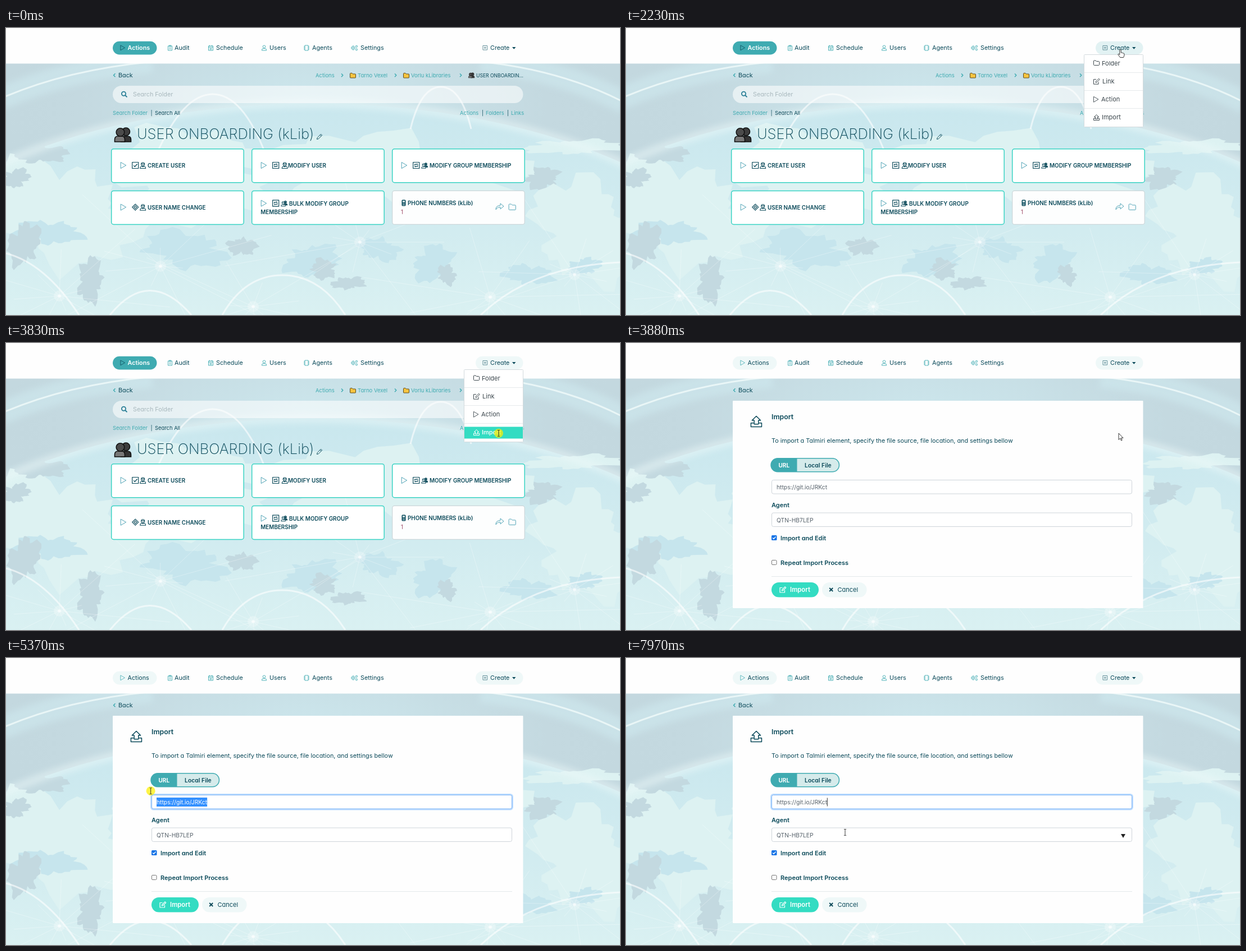
An HTML page that plays this animation: 1093x512 px, repeating every 8 s.

```html
<!DOCTYPE html>
<html lang="en">
<head>
<meta charset="utf-8">
<title>Import an element</title>
<style>
html, body { margin: 0; width: 100%; height: 100%; overflow: hidden; background: #fff; }
svg { display: block; width: 100vw; height: 100vh; }
text { font-family: Inter, "Open Sans", sans-serif; font-feature-settings: "cv11" 1; white-space: pre; }
</style>
</head>
<body>
<svg id="stage" viewBox="0 0 1093 512" xmlns="http://www.w3.org/2000/svg"></svg>
<script>
const INK = '#0b4a5a', TEAL = '#3fabb1', MINT = '#33dcc2', LAND = '#ddf2f2', SLATE = '#c3d9e0', SEA = '#c6e5ed';

const ICONS = {
  play: 'M.5.5L10 6 .5 11.5z',
  clip: 'M.5 1.5h7v8h-7zM2.5.5h3v2h-3zM2.5 5h3M2.5 7.2h3',
  cal: 'M.5 1.5h8v8h-8zM.5 3.8h8M2.5 0v2M6.5 0v2M2.5 6h4M2.5 7.7h4',
  user: 'M4.5.5a2.2 2.2 0 1 1 0 4.6a2.2 2.2 0 1 1 0-4.6zM.5 9.5v-1q0-2.4 2.4-2.4h3.2q2.4 0 2.4 2.4v1z',
  chip: 'M2 .5h6v9H2zM0 2.5h2M0 5h2M0 7.5h2M8 2.5h2M8 5h2M8 7.5h2',
  cogs: 'M4 2a3 3 0 1 1 0 6a3 3 0 1 1 0-6zM4 4a1 1 0 1 1 0 2a1 1 0 1 1 0-2zM4 .8v1.2M4 8v1.2M0 5h1M7 5h1M10 .7a1.6 1.6 0 1 1 0 3.2a1.6 1.6 0 1 1 0-3.2zM10 6.3a1.6 1.6 0 1 1 0 3.2a1.6 1.6 0 1 1 0-3.2z',
  plus: 'M.5.5h8v8h-8zM4.5 2.4v4.2M2.4 4.5h4.2',
  folder: 'M.5 1.5q0-1 1-1H4L5.5 2h4q1 0 1 1v5q0 1-1 1h-8q-1 0-1-1z',
  edit: 'M9 6.5v4H.5V2H5M4 7.5l.5-2 5-5 1.7 1.5-5 5z',
  upload: 'M3 7H.5v3.5h10V7H8M3.5 8V4.5h-2l4-4 4 4h-2V8z',
  check: 'M.5.5h11v11h-11zM3 6l2 2.5 4.5-5',
  loop: 'M.5.5h11v11h-11zM3.5 6.3V4.2h5L7.3 3M8.5 5.7v2.1h-5L4.7 9',
  diamond: 'M6 .5L11.5 6 6 11.5.5 6zM6 3.5L8.5 6 6 8.5 3.5 6z',
  person: 'M5.5 1a2.9 2.9 0 1 1 0 6a2.9 2.9 0 1 1 0-6zM3 2.5q2.5 2.5 5 .5M.6 11.5q0-3.5 3.4-4l1.5 1.2L7 7.5q3.4.5 3.4 4z',
  pencil: 'M.5 10.5l.8-3L8 .8 10.2 3 3.5 9.7zM6.5 2.3l2.2 2.2',
  share: 'M.5 12q-.5-7 8-7.5V1l6 5-6 5V7.6Q3 7.5.5 12z',
  left: 'M3.5.5l-3 3 3 3',
  right: 'M.5.5l3 3-3 3',
  cross: 'M1 1l6 6M7 1L1 7'
};

const icon = (name, x, y, color = TEAL, scale = 1, weight = 1, fill = 'none') =>
  `<path transform="translate(${x} ${y}) scale(${scale})" d="${ICONS[name]}" fill="${fill}" stroke="${color}" stroke-width="${weight}" stroke-linejoin="round"/>`;
const text = (x, y, s, size = 10.8, fill = INK, weight = 400, extra = '') =>
  `<text x="${x}" y="${y}" font-size="${size}" fill="${fill}" font-weight="${weight}" ${extra}>${s}</text>`;
const box = (x, y, w, h, r, fill, extra = '') =>
  `<rect x="${x}" y="${y}" width="${w}" height="${h}" rx="${r}" fill="${fill}" ${extra}/>`;
const line = (d, width = 1, color = '#fff', alpha = 1, extra = '') =>
  `<path d="${d}" fill="none" stroke="${color}" stroke-width="${width}" opacity="${alpha}" ${extra}/>`;
const group = (id, ...parts) => `<g id="${id}">${parts.join('')}</g>`;

// Jagged coastline around an ellipse
function coast(x, y, rx, ry, fill, seed) {
  let d = '';
  for (let i = 0; i < 48; i++) {
    const a = i / 48 * Math.PI * 2;
    const k = .85 + .18 * Math.sin(a * 2 + seed) + .12 * Math.sin(a * 5 + seed * 2.3) + .1 * Math.sin(a * 9 + seed * 5) + .07 * Math.sin(a * 17 + seed);
    d += `${i ? 'L' : 'M'}${(x + rx * k * Math.cos(a)).toFixed(1)} ${(y + ry * k * Math.sin(a)).toFixed(1)}`;
  }
  return `<path d="${d}z" fill="${fill}"/>`;
}

// Rays from a glowing city
function fan(x, y, seed) {
  let d = '';
  for (let i = 0; i < 11; i++) {
    const a = i * .571 + seed, r = 150 + 110 * Math.sin(seed * 9 + i * 4);
    d += `M${x} ${y}l${(r * Math.cos(a)).toFixed(1)} ${(r * .6 * Math.sin(a)).toFixed(1)}`;
  }
  return line(d, 1, '#fff', .3) + `<circle cx="${x}" cy="${y}" r="10" fill="#fff" opacity=".25"/><circle cx="${x}" cy="${y}" r="3" fill="#fff" opacity=".5"/>`;
}

function globe() {
  const coasts = [
    [95, 330, 150, 105, LAND], [62, 225, 48, 20, SLATE], [18, 268, 28, 18, SLATE],
    [330, 260, 170, 80, LAND], [690, 260, 250, 85, LAND], [1010, 212, 85, 16, LAND],
    [955, 268, 36, 20, SLATE], [1030, 360, 110, 95, LAND], [75, 365, 60, 26, SEA],
    [32, 385, 30, 45, SLATE], [150, 450, 28, 40, SLATE], [320, 395, 80, 36, SEA],
    [420, 390, 26, 20, SLATE], [545, 415, 55, 30, SEA], [565, 430, 28, 18, SLATE],
    [665, 395, 38, 24, SEA], [610, 455, 30, 14, SLATE], [760, 420, 42, 34, SEA],
    [785, 440, 20, 18, SLATE], [930, 440, 45, 22, SEA], [1030, 425, 30, 18, SEA]
  ];
  const arcs = ['M268 225Q315 118 368 118T462 225', 'M720 180Q738 105 774 105T828 180',
    'M385 512Q425 441 492 441T604 512', 'M845 512Q935 425 1093 418', 'M0 402Q70 420 130 512', 'M185 512Q255 425 330 512'];
  const hubs = [[630, 382], [440, 497], [95, 478], [862, 480], [1012, 440], [275, 425]];
  const limb = 'cx="546" cy="520" rx="800" ry="385"';
  const orbit = 'M-10 126Q105 75 260 60M845 60Q990 75 1103 134';
  return box(0, 63, 1093, 449, 0, 'url(#sky)') +
    line(orbit, 40, '#cfe9ef', .6, 'filter="url(#soft)"') +
    `<ellipse ${limb} fill="url(#ocean)"/>` +
    coasts.map((c, i) => coast(...c, i * 1.7)).join('') +
    `<ellipse ${limb} fill="none" stroke="#eefafa" stroke-width="14" opacity=".5" filter="url(#soft)"/>` +
    line(orbit, 3, '#effafa', .85) +
    arcs.map(d => line(d, 3, '#fff', .6)).join('') +
    hubs.map(([x, y], i) => fan(x, y, i * .37)).join('');
}

function tabs() {
  const items = [['clip', 288, 'Audit', 300], ['cal', 360, 'Schedule', 374], ['user', 455, 'Users', 469],
    ['chip', 530, 'Agents', 545], ['cogs', 614, 'Settings', 631]];
  return items.map(([name, x, s, tx]) => icon(name, x, 30.5, TEAL, 1, .9) + text(tx, 39, s)).join('');
}

const actionsTab = (fill, mark, ink, weight) =>
  box(190, 23.7, 78.5, 23.8, 11.9, fill) + icon('play', 203.5, 30.5, mark, .8) + text(216.5, 39, 'Actions', 10.8, ink, weight);

const busts = (x, y, k) => `<g transform="translate(${x} ${y}) scale(${k})" stroke="#111" stroke-width="1.6">
  <path d="M12 26v-4q0-6 6-6h6q6 0 6 6v4z" fill="#333"/><circle cx="21" cy="8" r="7" fill="#3d3d3d"/>
  <path d="M1 26v-4q0-6 6-6h6q6 0 6 6v4z" fill="#777"/><circle cx="11" cy="9" r="7.3" fill="#4b4b4b"/></g>`;
const pair = (x, y) => icon('person', x + 4.2, y + 1, INK, .72, 1.2, INK) + icon('person', x, y + 2, INK, .8, 1.2, '#fff');
const crumbFolder = x => icon('folder', x, 80, '#4a3a12', 1, .9, '#f9c440');

function card(col, row, title, tx, mark, who) {
  const x = 187.7 + col * 250, y = 215.7 + row * 74.7, mid = y + 23.3;
  const wrap = Array.isArray(title), iy = wrap ? mid - 7 : mid;
  return box(x, y, 235.5, 60, 4, '#fff', 'stroke="#3ad3c4" stroke-width="1.5"') +
    icon('play', x + 16, iy, '#4fa3b5') + icon(mark, x + 36.5, iy, INK, 1, 1.2) +
    (who === 'pair' ? pair(x + 51.5, iy) : icon('person', x + (col ? 53 : 50.5), iy, INK, 1, 1.1)) +
    (wrap ? text(tx, iy + 10, title[0], 9.9, INK, 600) + text(x + 15.5, iy + 25, title[1], 9.9, INK, 600)
      : text(tx, mid + 10, title, 9.9, INK, 600));
}

function folderPage() {
  const bar = x => text(x, 154.5, '|', 9.4);
  return actionsTab(TEAL, INK, '#fff', 600) +
    text(551, 87.5, 'Actions', 9.5, TEAL) + icon('right', 596.5, 81, TEAL, .95, 1.5) +
    crumbFolder(612) + text(626, 87.5, 'Tarno Vexel', 9.5, TEAL) + icon('right', 691.5, 81, TEAL, .95, 1.5) +
    crumbFolder(707) + text(721, 87.5, 'Vorlu kLibraries', 9.5, TEAL) + icon('right', 807.5, 81, TEAL, .95, 1.5) +
    busts(823, 79.5, .36) + text(837, 87.5, 'USER ONBOARDIN…', 8.6) +
    box(190, 103, 730.5, 31, 15.5, '#fff', 'opacity=".58"') +
    '<g fill="none" stroke="#2a7f96" stroke-width="1.8"><circle cx="209.5" cy="117.3" r="3.6"/><path d="M212.2 120l3.3 3.3"/></g>' +
    text(226, 122, 'Search Folder', 10.8, '#a9b9be') +
    text(190, 154.5, 'Search Folder', 9.4, TEAL) + bar(257.5) + text(265, 154.5, 'Search All', 9.4) +
    text(808, 154.5, 'Actions', 9.4, TEAL) + bar(847) + text(854, 154.5, 'Folders', 9.4, TEAL) + bar(892) + text(899, 154.5, 'Links', 9.4, TEAL) +
    busts(192.5, 177, 1) + text(233, 198, 'USER ONBOARDING (kLib)', 25.6, INK, 200) + icon('pencil', 553, 188.5, INK, .95) +
    card(0, 0, 'CREATE USER', 252, 'check') + card(1, 0, 'MODIFY USER', 502, 'loop') +
    card(2, 0, 'MODIFY GROUP MEMBERSHIP', 754, 'loop', 'pair') + card(0, 1, 'USER NAME CHANGE', 252, 'diamond') +
    card(1, 1, ['BULK MODIFY GROUP', 'MEMBERSHIP'], 504, 'loop', 'pair') +
    box(687.7, 290.4, 235.5, 60, 4, '#fdfefe', 'stroke="#ccd6d9" stroke-width="1.2"') +
    box(704.5, 306.5, 7, 11, 1.5, INK) + box(706, 308, 4, 3, 0, '#cfe6ea') + line('M706 313h4M706 315.5h4', 1, '#cfe6ea') +
    text(715, 316, 'PHONE NUMBERS (kLib)', 9.9, INK, 600) + text(703, 331.5, '1', 9.8, '#9a4560') +
    icon('share', 871.5, 312, '#4fa3b5') + icon('folder', 894.5, 313.5, '#4fa3b5', 1.22, .8);
}

function menu() {
  const rows = [['folder', 'Folder', 847], ['edit', 'Link', 848], ['play', 'Action', 846], ['upload', 'Import', 847]];
  return box(815.5, 47.5, 105, 129, 1, '#fff', 'stroke="#d3dadd"') +
    line('M816 79.5h104M816 111.5h104M816 143.5h104', 1, '#e6eaec') +
    rows.map(([name, s, x], i) => icon(name, 832, 57.5 + i * 32.2, '#3c474d', name === 'play' ? .9 : 1) +
      text(x, 66.7 + i * 32.2, s, 11, '#3c474d')).join('') +
    group('pick', box(816, 149.5, 104, 21, 0, MINT), icon('upload', 832, 154.1, '#fff'), text(847, 163.3, 'Import', 11, '#fff', 500));
}

const URL_TEXT = 'https://git.io/JRKct';
function importPage() {
  const frame = y => box(259.5, y, 641, 24.5, 3, '#fff', 'stroke="#ced4da"');
  return actionsTab('#eff8f8', TEAL, INK, 400) +
    box(190, 103, 730.5, 370, 1, '#fefefe') +
    icon('upload', 221.5, 129.5, INK, 1.9, .8) + text(259, 136, 'Import', 12.3, INK, 600) +
    text(259, 178, 'To import a Talmiri element, specify the file source, file location, and settings bellow') +
    box(258, 205.8, 121.5, 24, 12, '#d5ebeb', `stroke="${TEAL}" stroke-width="1.5"`) +
    `<path d="M304.5 205.8H270a12 12 0 0 0 0 24h34.5z" fill="${TEAL}"/>` +
    text(271.5, 221.5, 'URL', 10, '#fff', 700) + text(318, 221.5, 'Local File', 10.4, INK, 600) +
    frame(244.5) + group('focus', box(258.5, 243.5, 643, 26.5, 4, 'none', 'stroke="#bcdcff" stroke-width="3"'),
      box(259.5, 244.5, 641, 24.5, 3, '#fff', 'stroke="#7fb4f5"')) +
    text(268, 261, URL_TEXT, 10.3, '#56616a', 400, 'id="url"') +
    group('selection', box(268, 249, 93, 16, 0, '#3390ff', 'id="mark"'),
      text(268, 261, URL_TEXT, 10.3, '#fff', 400, 'clip-path="url(#marked)"')) +
    box(360, 249.5, 1, 15, 0, '#333', 'id="caret"') +
    text(259, 293, 'Agent', 11, INK, 600) + frame(303) + text(268, 319.5, 'QTN-HB7LEP', 10.3, '#56616a') +
    '<path id="drop" d="M881 314h8l-4 7z" fill="#222"/>' +
    box(259, 343, 9.5, 9, 1.5, '#1473e6') + line('M261 347.5l2 2 3.500-4', 1.3) + text(275, 351.7, 'Import and Edit', 11, INK, 600) +
    box(259.5, 387.5, 8.5, 8, 1.5, '#fff', 'stroke="#767676"') + text(275, 395.7, 'Repeat Import Process', 11, INK, 600) +
    line('M259 416.5h642', 1, '#e3e8ea') +
    box(259, 427, 84, 26.5, 13.2, MINT) + icon('edit', 273.5, 434.5, '#fff', 1, 1.2) + text(292, 444, 'Import', 11.3, '#fff', 600) +
    box(349, 427, 79.5, 26.5, 13.2, '#eff8f8') + icon('cross', 361.2, 436, INK, 1, 1.9) + text(376.5, 444, 'Cancel', 11);
}

const pointer = (id, d, fill) => `<path id="${id}" d="${d}" fill="${fill}" stroke="#222" stroke-width=".9" stroke-linejoin="round"/>`;

document.getElementById('stage').innerHTML = `<defs>
  <radialGradient id="sky" gradientUnits="userSpaceOnUse" cx="546" cy="160" r="560" gradientTransform="matrix(1 0 0 .4 0 80)">
    <stop offset="0" stop-color="#cde8ee"/><stop offset=".75" stop-color="#c4d9e0"/><stop offset="1" stop-color="#c3d8df"/></radialGradient>
  <linearGradient id="ocean" x1="0" y1="0" x2="0" y2=".5"><stop offset="0" stop-color="#c9e7ee"/><stop offset=".6" stop-color="#d2ecf0"/><stop offset="1" stop-color="#daf1f2"/></linearGradient>
  <filter id="soft" x="-10%" y="-40%" width="120%" height="180%"><feGaussianBlur stdDeviation="6"/></filter>
  <clipPath id="marked"><rect id="markClip" x="268" y="249" width="93" height="16"/></clipPath></defs>` +
  globe() + box(0, 0, 1093, 63.5, 0, '#fefefe') + tabs() +
  icon('left', 191, 80.7, TEAL, 1, 1.5) + text(200, 88, 'Back') +
  group('folderPage', folderPage()) + group('importPage', importPage()) +
  box(836, 23.7, 84.5, 23.8, 11.9, '#eff8f8', 'id="pill"') + icon('plus', 848.5, 31, '#5e8d97', .95) +
  text(862, 39, 'Create') + `<path d="M901 34h6.5l-3.250 3.7z" fill="${INK}"/>` +
  group('menu', menu()) +
  group('mouse', '<circle id="press" r="8" fill="#fff000" opacity=".72"/>',
    pointer('arrow', 'M0 0v11.5L2.7 9l1.800 4 1.7-.8L4.4 8.4H8z', '#fff'),
    pointer('hand', 'M-1.2 1q1.2-1.6 2.4 0v5.2q1.5-.8 2 .3 1.6-.6 2 .6 1.7-.3 1.7 1.2v3l-1.4 3.3H-.3L-4 9.5q-.3-1.6 1.3-1.2l1.5 1.5z', '#fff'),
    pointer('beam', 'M-2-5.5h1.5L0-5l.5-.5H2M0-5V5M-2 5.5h1.5L0 5l.5.5H2', 'none'));

const $ = Object.fromEntries([...document.querySelectorAll('[id]')].map(e => [e.id, e]));
const show = (id, on) => { $[id].style.display = on ? '' : 'none'; };

// start, end, steps, from x, y, to x, y
const MOVES = [
  [510, 1240, 16, 1047, 508, 880, 46],
  [1340, 1440, 3, 880, 46, 880, 38],
  [3190, 3600, 10, 880, 38, 877, 161],
  [4350, 4910, 13, 877, 161, 463, 250.5],
  [5090, 5140, 2, 463, 250.5, 448, 252],
  [5190, 5420, 6, 448, 252, 191, 232],
  [7510, 7970, 10, 191, 232, 390, 311]
];

function mouseAt(t) {
  const move = MOVES.filter(m => m[0] <= t).pop();
  if (!move) return null;
  const [t0, t1, n, x0, y0, x1, y1] = move;
  const p = Math.min(1, (Math.floor((t - t0) / (t1 - t0) * (n - 1) + 1e-6) + 1) / n);
  const e = p * p * (3 - 2 * p);
  return [x0 + (x1 - x0) * e, y0 + (y1 - y0) * e];
}

const within = (t, a, b) => t >= a && t < b;

function draw(t) {
  const pos = mouseAt(t), [x, y] = pos || [0, 0];
  const importing = t >= 3880, drag = within(t, 5140, 5600);
  const inField = importing && x > 259 && (within(y, 244, 270) || within(y, 303, 328));
  const hand = !importing && y < 47, beam = drag || inField || (within(t, 2230, 3880) && y > 150);

  show('folderPage', !importing);
  show('importPage', importing);
  show('menu', within(t, 2230, 3880));
  show('pick', within(t, 3830, 3880));
  show('pill', t >= 1240 || (pos && y < 47));
  $.pill.setAttribute('fill', t < 3830 ? '#e2f2f3' : '#eff8f8');

  show('mouse', pos);
  $.mouse.setAttribute('transform', `translate(${x} ${y})`);
  show('press', within(t, 2130, 2230) || within(t, 3830, 3880) || drag);
  show('hand', hand);
  show('beam', beam);
  show('arrow', !hand && !beam);

  if (!importing) return;
  $.focus.style.opacity = Math.max(0, Math.min(1, (t - 5110) / 150));
  const end = 268 + $.url.getComputedTextLength();
  const left = Math.max(268, Math.min(end, x));
  show('selection', within(t, 5190, 6440));
  for (const r of [$.mark, $.markClip]) {
    r.setAttribute('x', left);
    r.setAttribute('width', end - left);
  }
  $.caret.setAttribute('x', end - .3);
  show('caret', within(t, 5140, 5190) || within(t, 6440, 6950) || t >= 7510);
  show('drop', inField && y > 300);
}

const start = performance.now();
function tick() {
  draw((performance.now() - start) % 8000);
  requestAnimationFrame(tick);
}
tick();
</script>
</body>
</html>
```
